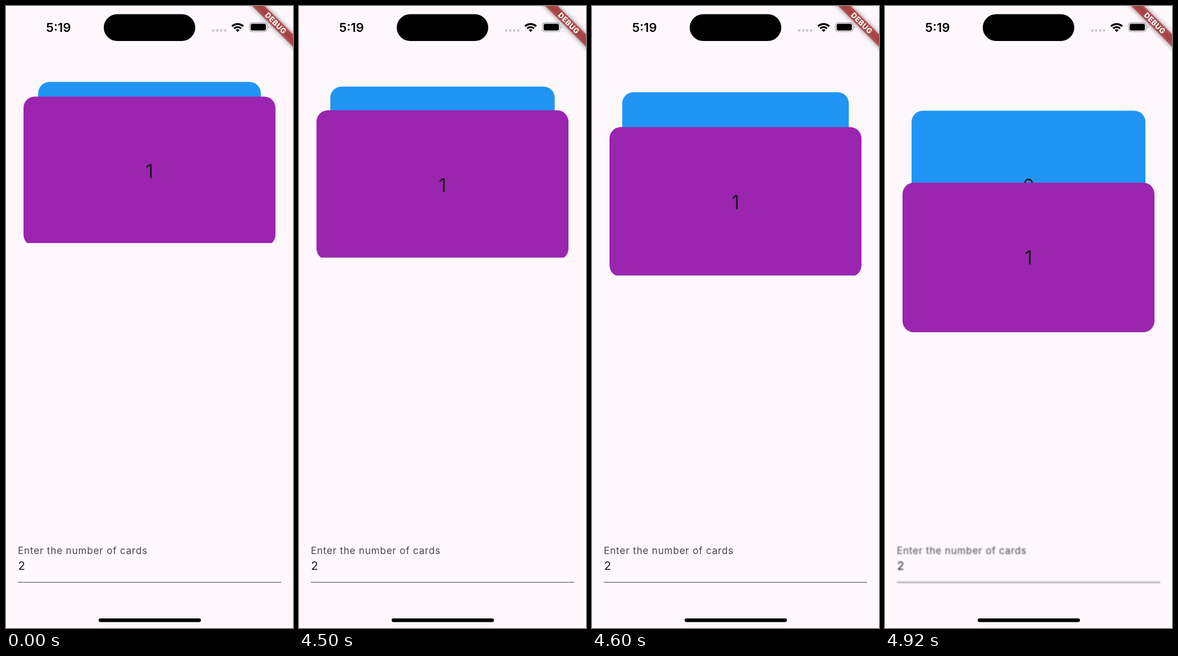
An HTML page that plays this animation: 508x1102 px, repeating every 5000 ms.

```html
<!DOCTYPE html>
<html lang="en">
<head>
<meta charset="utf-8">
<title>Card stack</title>
<style>
  html, body { margin: 0; width: 100%; height: 100%; overflow: hidden; background: #fef8fd; }
  svg { display: block; width: 100%; height: 100%; }
  text { font-family: Inter, Roboto, sans-serif; fill: #1d1b20; }
  .digit { font-size: 33.5px; text-anchor: middle; }
  #field { color: #49454f; }
</style>
</head>
<body>
<svg viewBox="0 0 508 1102">
  <defs>
    <clipPath id="viewport"><rect id="clipBox" width="508"/></clipPath>
    <filter id="soft" x="-20%" y="-100%" width="140%" height="300%"><feGaussianBlur stdDeviation="4.2"/></filter>
  </defs>

  <!-- Card stack -->
  <g clip-path="url(#viewport)">
    <g id="backCard">
      <rect id="backFace" height="265" rx="20" fill="#2195f3"/>
      <text class="digit" x="254" y="145">0</text>
    </g>
    <g id="frontCard">
      <rect x="31" width="446" height="265" rx="20" fill="#9b25af"/>
      <text class="digit" x="254" y="145">1</text>
    </g>
  </g>

  <!-- Text field -->
  <g id="field">
    <text x="21" y="971" font-size="17" letter-spacing=".8" style="fill:#49454f">Enter the number of cards</text>
    <text x="21.3" y="999.3" font-size="20.7">2</text>
    <rect x="21" y="1020.4" width="466" height="1.3" fill="#68646c"/>
  </g>

  <!-- Status bar -->
  <text x="93" y="46" font-size="22" font-weight="600" text-anchor="middle" style="fill:#000">5:19</text>
  <rect x="173" y="14.5" width="162" height="47.5" rx="23.75"/>
  <path d="M366.8 43.3h21.3" stroke="#cbc5cb" stroke-width="4.6" stroke-linecap="round" stroke-dasharray="0 7"/>
  <g fill="none" stroke="#000">
    <path d="M400.1 36.1a14 14 0 0 1 19.8 0" stroke-width="3.5"/>
    <path d="M403.9 39.9a8.6 8.6 0 0 1 12.2 0" stroke-width="3.2"/>
    <path d="M410 46l-3.4-3.4a4.8 4.8 0 0 1 6.8 0z" fill="#000" stroke="none"/>
  </g>
  <rect x="431" y="29.6" width="31" height="15.9" rx="4.8" fill="none" stroke="#a29da2" stroke-width="1.2"/>
  <rect x="433" y="31.6" width="27" height="11.9" rx="3.2"/>
  <path d="M464 35q3 2.5 0 5z" fill="#a29da2"/>

  <!-- Corner ribbon -->
  <g transform="translate(477.5 30.5) rotate(45)">
    <rect x="-80" y="-7.7" width="160" height="15.5" opacity=".5" filter="url(#soft)"/>
    <rect x="-80" y="-7.7" width="160" height="15.5" fill="#b71c1c" fill-opacity=".63"/>
    <text y="4.6" font-size="13" font-weight="800" letter-spacing=".4" text-anchor="middle" style="fill:#fff">DEBUG</text>
  </g>

  <rect x="164" y="1085" width="181" height="6.6" rx="3.3"/>
</svg>

<script>
const LOOP = 5000, STEP = 100, PULL_START = 4400;
const pull = [0, 24.4, 54.2, 105.8, 152.7];  // drag distance at each step
const blur = [0, 0, 0, 0.65, 1.1];
const byId = id => document.getElementById(id);
const moveTo = (id, y) => byId(id).setAttribute("transform", `translate(0 ${y})`);

function draw(time) {
  const step = Math.min(pull.length - 1, Math.max(0, Math.floor((time - PULL_START) / STEP)));
  const drag = pull[step];
  const inset = 57 - drag / 15.3;

  moveTo("frontCard", 160.4 + drag);
  moveTo("backCard", 134.6 + drag / 3);
  byId("backFace").setAttribute("x", inset);
  byId("backFace").setAttribute("width", 508 - 2 * inset);
  byId("clipBox").setAttribute("height", 420 + drag * 1.06);
  byId("field").style.filter = blur[step] ? `blur(${blur[step]}px)` : "none";
}

function tick() {
  draw(performance.now() % LOOP);
  requestAnimationFrame(tick);
}
tick();
</script>
</body>
</html>
```
